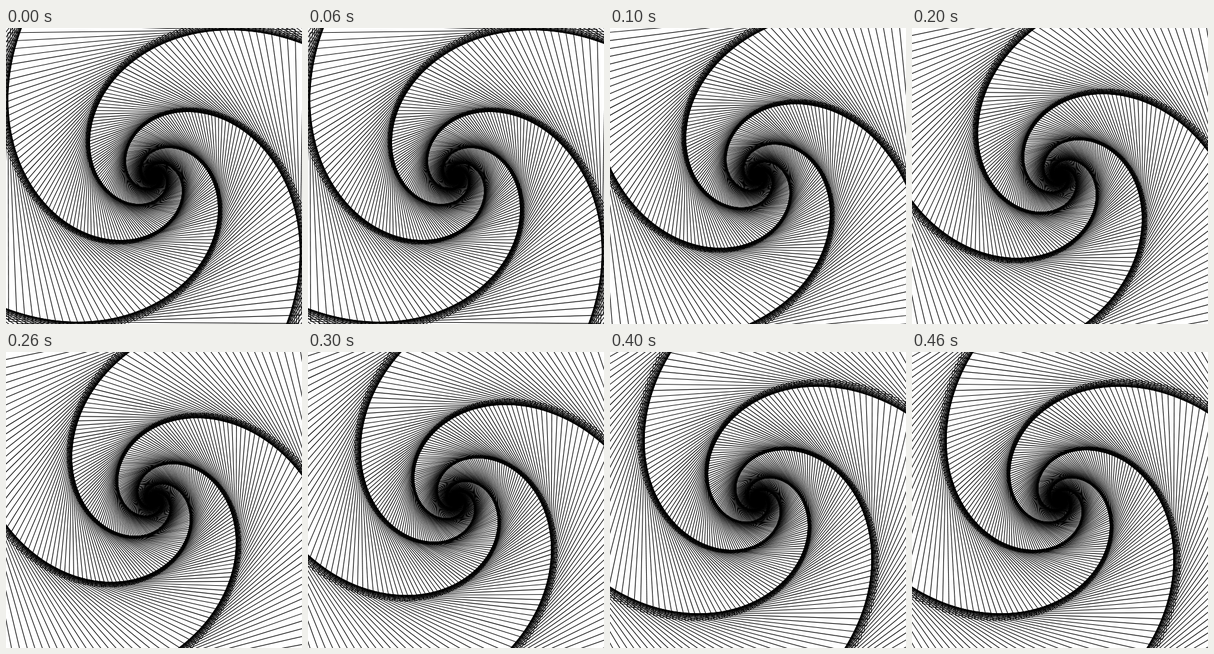
Recreate the animation shown at these times as an HTML page with a canvas. Size 500 by 500 pixels, loop 0.5 s.

```html
<!DOCTYPE html>
<html lang="en">
<head>
<meta charset="utf-8">
<title>Square whirl</title>
<style>
  html, body { margin: 0; width: 100%; height: 100%; overflow: hidden; background: #fff; }
  canvas { display: block; }
</style>
</head>
<body>
<canvas id="stage" width="500" height="500"></canvas>
<script>
const ctx = document.getElementById('stage').getContext('2d');
const CENTER = 250;
const STEP_MS = 100;
const STEPS = 5;
const TURN = 89.45 * Math.PI / 180;  // angle between neighbouring corners
const SHRINK = 0.995;                // radius ratio of neighbouring corners
const BASE = 47.8;                   // distance of the level side from the centre
const VIEW_STEP = 0.1086;            // the view narrows by this share each step
const MAX_RADIUS = 900;
const MIN_RADIUS = 0.5;

// Distance of a side from the centre, for a side that starts at radius 1.
const SIDE_DISTANCE = SHRINK * Math.sin(TURN) /
  Math.sqrt(1 + SHRINK ** 2 - 2 * SHRINK * Math.cos(TURN));
const START_ANGLE = -Math.acos(SIDE_DISTANCE);

function corner(radius, n) {
  const r = radius * SHRINK ** n;
  const angle = START_ANGLE + n * TURN;
  return [CENTER + r * Math.sin(angle), CENTER - r * Math.cos(angle)];
}

const indexAt = (ratio) => Math.ceil(Math.log(ratio) / Math.log(SHRINK));

function draw(step) {
  const radius = BASE / SIDE_DISTANCE / (1 - VIEW_STEP * step);
  const first = indexAt(MAX_RADIUS / radius);
  const last = indexAt(MIN_RADIUS / radius);
  ctx.fillStyle = '#fff';
  ctx.fillRect(0, 0, 500, 500);
  ctx.strokeStyle = '#000';
  ctx.lineWidth = 1.15;
  for (let n = first; n < last; n++) {
    ctx.beginPath();
    ctx.moveTo(...corner(radius, n));
    ctx.lineTo(...corner(radius, n + 1));
    ctx.stroke();
  }
}

let shown = -1;
function tick() {
  const step = Math.floor(performance.now() / STEP_MS) % STEPS;
  if (step !== shown) draw(shown = step);
  requestAnimationFrame(tick);
}
tick();
</script>
</body>
</html>
```
